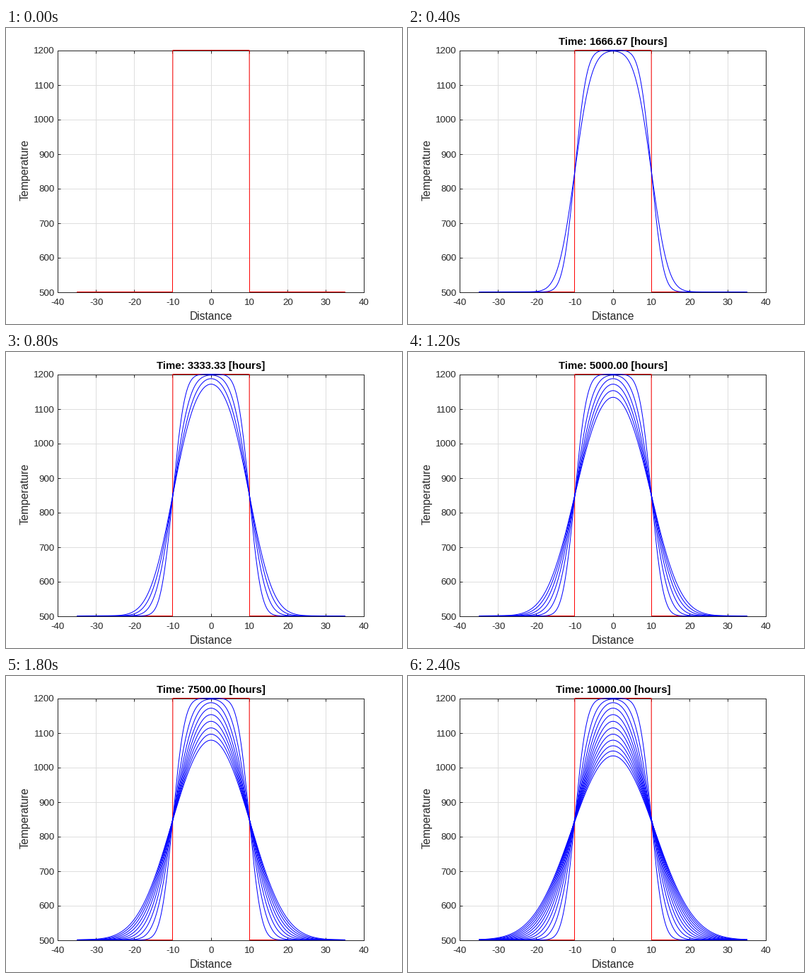
Write a matplotlib script that moves like this. It is 560 px wide and 420 px high and loops after 2.6 s.

```python
import math

import matplotlib.pyplot as plt
import numpy as np
from matplotlib.animation import FuncAnimation
from matplotlib.transforms import Affine2D

WIDTH, HEIGHT, DPI = 560, 420, 70
LEFT, RIGHT, TOP, BOTTOM = 73, 506, 32, 375
PX = 72 / DPI  # points per pixel

T_ROCK, T_MAGMA, HALF_WIDTH = 500, 1200, 10
DIFFUSIVITY = 1e-6
STEP_HOURS = 10000 / 12
STEPS = 12
INK = "#262626"

plt.rcParams["font.family"] = "Liberation Sans"
fig = plt.figure(figsize=(WIDTH / DPI, HEIGHT / DPI), dpi=DPI, facecolor="white")
ax = fig.add_axes([LEFT / WIDTH, 1 - BOTTOM / HEIGHT,
                   (RIGHT - LEFT) / WIDTH, (BOTTOM - TOP) / HEIGHT])
ax.set(xlim=(-40, 40), ylim=(T_ROCK, T_MAGMA))
x_ticks, y_ticks = range(-40, 41, 10), range(500, 1201, 100)
ax.set_xticks(x_ticks, [])
ax.set_yticks(y_ticks, [])
ax.tick_params(direction="in", top=True, right=True,
               length=4.3 * PX, width=PX, color=INK)
ax.grid(color="#dedede", linewidth=PX)
ax.set_axisbelow(True)
for spine in ax.spines.values():
    spine.set(color=INK, linewidth=PX)

# Snapped axis lines sit on pixel centres, so the curves move there too.
on_pixel_centres = ax.transData + Affine2D().translate(0.5, 0.5)


def label(x, y, text, size, **style):
    """Place text with its baseline at a pixel position from the top left."""
    options = dict(color=INK, ha="center", va="baseline") | style
    return fig.text(x / WIDTH, 1 - y / HEIGHT, text, fontsize=size * PX, **options)


for x in x_ticks:
    label(290 + x * (RIGHT - LEFT) / 80, 393, f"{x}", 13.33)
for y in y_ticks:
    y_pixel = BOTTOM - (y - T_ROCK) / 700 * (BOTTOM - TOP)
    label(68.5, y_pixel + 4.5, f"{y}", 13.33, ha="right")
label(290, 414, "Distance", 15.5)
label(31.5, 201, "Temperature", 15.5, rotation=90, rotation_mode="anchor")
title = label(290, 24, "", 15, color="black", weight="bold")


def curve(x, y, color, zorder):
    return ax.plot(x, y, color=color, linewidth=PX, clip_on=False,
                   zorder=zorder, transform=on_pixel_centres)[0]


def temperature(x, hours):
    spread = 2 * math.sqrt(DIFFUSIVITY * hours * 3600)
    erf = np.vectorize(math.erf)
    profile = erf((HALF_WIDTH - x) / spread) + erf((HALF_WIDTH + x) / spread)
    return T_ROCK + (T_MAGMA - T_ROCK) / 2 * profile


curve([-35, -10.07, -10, 10, 10.07, 35],
      [T_ROCK, T_ROCK, T_MAGMA, T_MAGMA, T_ROCK, T_ROCK], "red", 4)
distance = np.linspace(-35, 35, 701)
profiles = [curve(distance, temperature(distance, n * STEP_HOURS), "blue", 5)
            for n in range(1, STEPS + 1)]


def update(step):
    title.set_text(f"Time: {step * STEP_HOURS:.2f} [hours]" if step else "")
    for n, profile in enumerate(profiles, 1):
        profile.set_visible(n <= step)
    return [title, *profiles]


animation = FuncAnimation(fig, update, frames=STEPS + 1, interval=200,
                          repeat=True, repeat_delay=0, blit=False)
plt.show()
```
